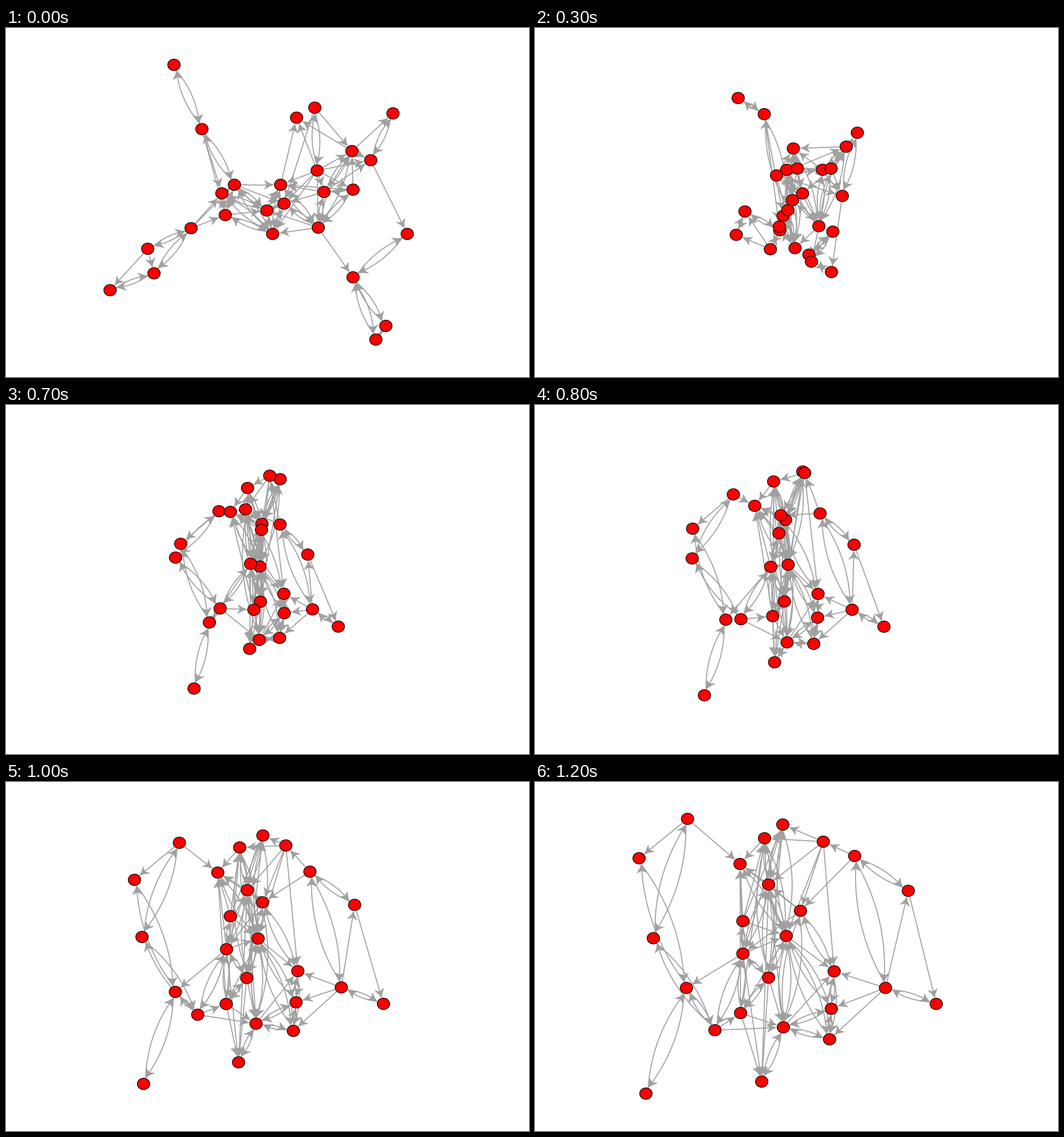
Recreate the animation shown at these times as a matplotlib script. Size 917x611 px, loop 2.3 s.

```python
import math
import numpy as np
import matplotlib.pyplot as plt
from matplotlib.animation import FuncAnimation
from matplotlib.collections import EllipseCollection, LineCollection, PolyCollection

W, H, DPI = 917, 611, 64
PX = 72 / DPI                      # points per pixel
STEPS = 11
STRETCH = np.array([1.09, 1.0])    # the plot is slightly wider than tall
RADIUS, BEND = 10.8, 0.14
RED, GREY = "#ff0000", "#a0a0a0"

# name: start x, start y, end x, end y (later nodes lie on top)
NODES = {
    "F": (324, 350, 614, 360), "E": (384, 327, 524, 331), "D": (378, 289, 516, 450),
    "N": (547, 349, 409, 342), "Y": (665.5, 521, 267, 64), "Q": (608, 282.5, 434, 74),
    "O": (557, 286.5, 409, 179), "Z": (648, 545, 182, 133), "C": (400, 274, 519, 396.5),
    "H": (259, 429, 560, 129), "S": (639, 231, 360, 404), "B": (343, 176.5, 505, 104),
    "T": (678, 149, 364, 243), "A": (294, 64, 465, 225), "X": (608, 436, 265, 360),
    "G": (248, 386, 703, 388), "I": (182, 458.5, 654, 190), "J": (457, 319, 440, 269),
    "K": (487, 307, 359, 143), "L": (481, 274, 402, 98), "M": (467, 360, 435, 429),
    "P": (545, 249, 207, 273), "R": (606, 215, 364, 300), "U": (541, 139, 315, 434),
    "V": (509, 156.5, 397, 524), "W": (703, 360, 194, 545),
}

BEFORE = (
    "AB BC CD CE DE FG FH HI CJ DJ CM DM EM JK JM KM LM ST OR NR NO NQ OQ "
    "PU WX XY XZ YZ KN LN JL",
    "BD BE CL CK EJ FC FD FE GH GI RT RV RS SW NX PS OS UR PR QR PQ PN PO "
    "PL PK PM PV UK LV QL OL OK NJ NM",
)
AFTER = (
    "YP XZ PU XU XW HI HF FG RU EC CD ED JC JD JM MC MD MV AE AM RN ON JN "
    "JO LJ QJ LN RS NS TR RO OL OQ JK",
    "YZ YK RX LK BL BQ BO BA BE BJ HB HA IG FI FE FC FD UM US RJ AR AK RK "
    "TK SK TJ TL TQ OK AO JE JS ME NM NV NQ RV SV SM SL RQ OV OM",
)


def edge_list(mutual, single):
    """Triples of tail, head and bend; mutual ties bow to opposite sides."""
    edges = []
    for a, b in mutual.split():
        edges += [(a, b, BEND), (b, a, BEND)]
    return edges + [(a, b, 0) for a, b in single.split()]


EARLY, LATE = edge_list(*BEFORE), edge_list(*AFTER)
COORDS = np.array(list(NODES.values()), float) + 0.5   # pixel centres
START, END = COORDS[:, :2], COORDS[:, 2:]

# arrowhead pointing along +x with its tip at the origin
HEAD = np.array([(0, 0), (-7, 2.8), (-15.5, 8), (-11.5, 0), (-15.5, -8), (-7, -2.8)])


def bezier(a, c, b, t):
    t = np.asarray(t)[..., None]
    return (1 - t) ** 2 * a + 2 * t * (1 - t) * c + t ** 2 * b


def draw_edge(p, q, bend):
    """Line points and arrowhead polygon for one tie, or None if too close."""
    p, q = p / STRETCH, q / STRETCH
    dist = math.hypot(*(q - p))
    if dist < 2 * RADIUS + 3:
        return None
    u = (q - p) / dist
    a, b = p + u * RADIUS, q - u * RADIUS
    span = dist - 2 * RADIUS
    side = np.array([u[1], -u[0]])
    c = (a + b) / 2 + side * bend * span
    line = bezier(a, c, b, np.linspace(0, max(0, 1 - 9 / span), 20))
    d = b - bezier(a, c, b, max(0, 1 - 12 / span))
    d = d / math.hypot(*d)
    head = b + HEAD @ np.array([d, (-d[1], d[0])])
    return line * STRETCH, head * STRETCH


fig = plt.figure(figsize=(W / DPI, H / DPI), dpi=DPI, facecolor="white")
ax = fig.add_axes([0, 0, 1, 1])
ax.set_xlim(0, W)
ax.set_ylim(H, 0)
ax.axis("off")

lines = LineCollection([], colors=GREY, linewidths=1.75 * PX, zorder=1)
heads = PolyCollection([], facecolors=GREY, edgecolors=GREY, linewidths=0.4 * PX, zorder=2)
dots = EllipseCollection(
    [21.8] * len(NODES), [20] * len(NODES), [0] * len(NODES), units="xy",
    offsets=START, offset_transform=ax.transData,
    facecolors=RED, edgecolors="black", linewidths=1.2 * PX, zorder=3)
for art in (lines, heads, dots):
    ax.add_collection(art, autolim=False)


def update(frame):
    step = min(max(frame - 1, 0), STEPS)
    ease = math.log(1 + 5 * step / STEPS) / math.log(6)
    pos = START + (END - START) * ease
    at = dict(zip(NODES, pos))
    edges = EARLY if step < STEPS / 2 else LATE
    parts = [draw_edge(at[a], at[b], bend) for a, b, bend in edges]
    parts = [part for part in parts if part]
    lines.set_segments([part[0] for part in parts])
    heads.set_verts([part[1] for part in parts])
    dots.set_offsets(pos)
    return lines, heads, dots


anim = FuncAnimation(fig, update, frames=23, interval=100, repeat=True,
                     repeat_delay=0, blit=False)
plt.show()
```
